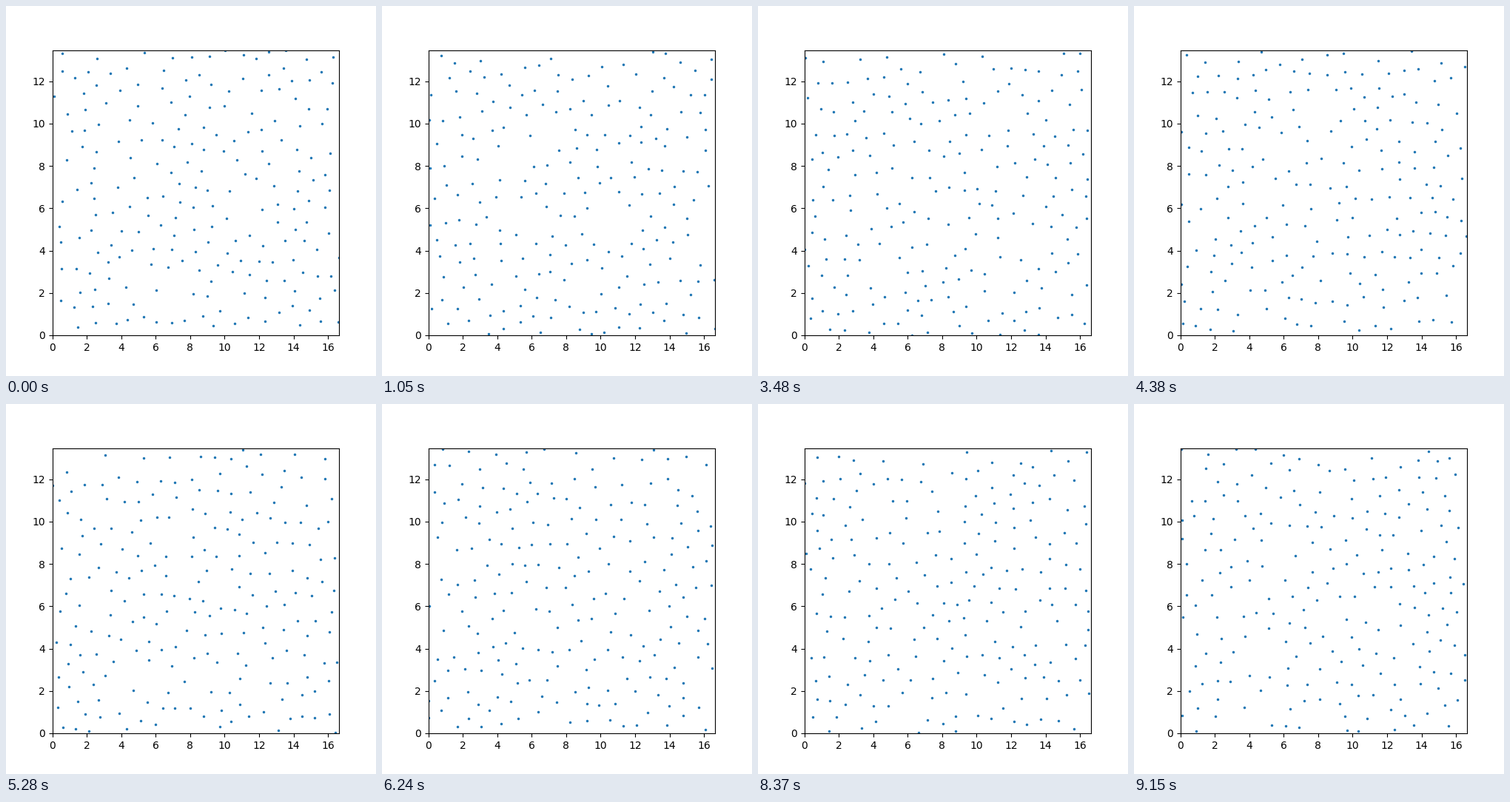
Write a matplotlib script that moves like this. It is 500 px wide and 500 px high and loops after 9.18 s.

```python
import numpy as np
import matplotlib.pyplot as plt
from matplotlib.animation import FuncAnimation

FRAMES = 306
INTERVAL = 30
COLS, ROWS = 15, 14
A = 1.10935                   # lattice spacing
BOX = np.array([COLS * A, ROWS * A * np.sqrt(3) / 2])
SIGMA = 0.72                  # core size, V = (SIGMA / r)**12
SUBSTEPS = 3
DT = 0.04 / SUBSTEPS
WARMUP = 300

rng = np.random.default_rng(7)


def forces(pos):
    d = pos[:, None] - pos[None]
    d -= BOX * np.rint(d / BOX)
    r2 = d[..., 0] ** 2 + d[..., 1] ** 2
    np.fill_diagonal(r2, np.inf)
    s6 = (SIGMA ** 2 / r2) ** 3
    return np.einsum("ij,ijk->ik", 12 * s6 * s6 / r2, d)


def step(pos, vel, acc):
    """One velocity Verlet step in the periodic box."""
    vel = vel + 0.5 * DT * acc
    pos = (pos + DT * vel) % BOX
    acc = forces(pos)
    return pos, vel + 0.5 * DT * acc, acc


def simulate():
    i, j = np.meshgrid(np.arange(COLS), np.arange(ROWS))
    pos = np.stack([(i + 0.5 * (j % 2)) * A, j * A * np.sqrt(3) / 2], -1)
    pos = pos.reshape(-1, 2)
    vel = rng.normal(0, 1, pos.shape)
    vel -= vel.mean(axis=0)
    acc = forces(pos)

    # melt the lattice, holding the temperature at 1
    for n in range(WARMUP):
        pos, vel, acc = step(pos, vel, acc)
        if n % 10 == 9:
            vel /= np.sqrt((vel ** 2).mean())

    path = []
    for _ in range(FRAMES):
        path.append(pos)
        for _ in range(SUBSTEPS):
            pos, vel, acc = step(pos, vel, acc)
    return path


path = simulate()

fig, ax = plt.subplots(figsize=(5, 5), dpi=100)
ax.set_xlim(0, BOX[0])
ax.set_ylim(0, BOX[1])
dots, = ax.plot([], [], ".", ms=3)


def update(n):
    dots.set_data(path[n][:, 0], path[n][:, 1])
    return dots,


anim = FuncAnimation(fig, update, frames=FRAMES, interval=INTERVAL,
                     repeat=True, repeat_delay=0)
plt.show()
```
